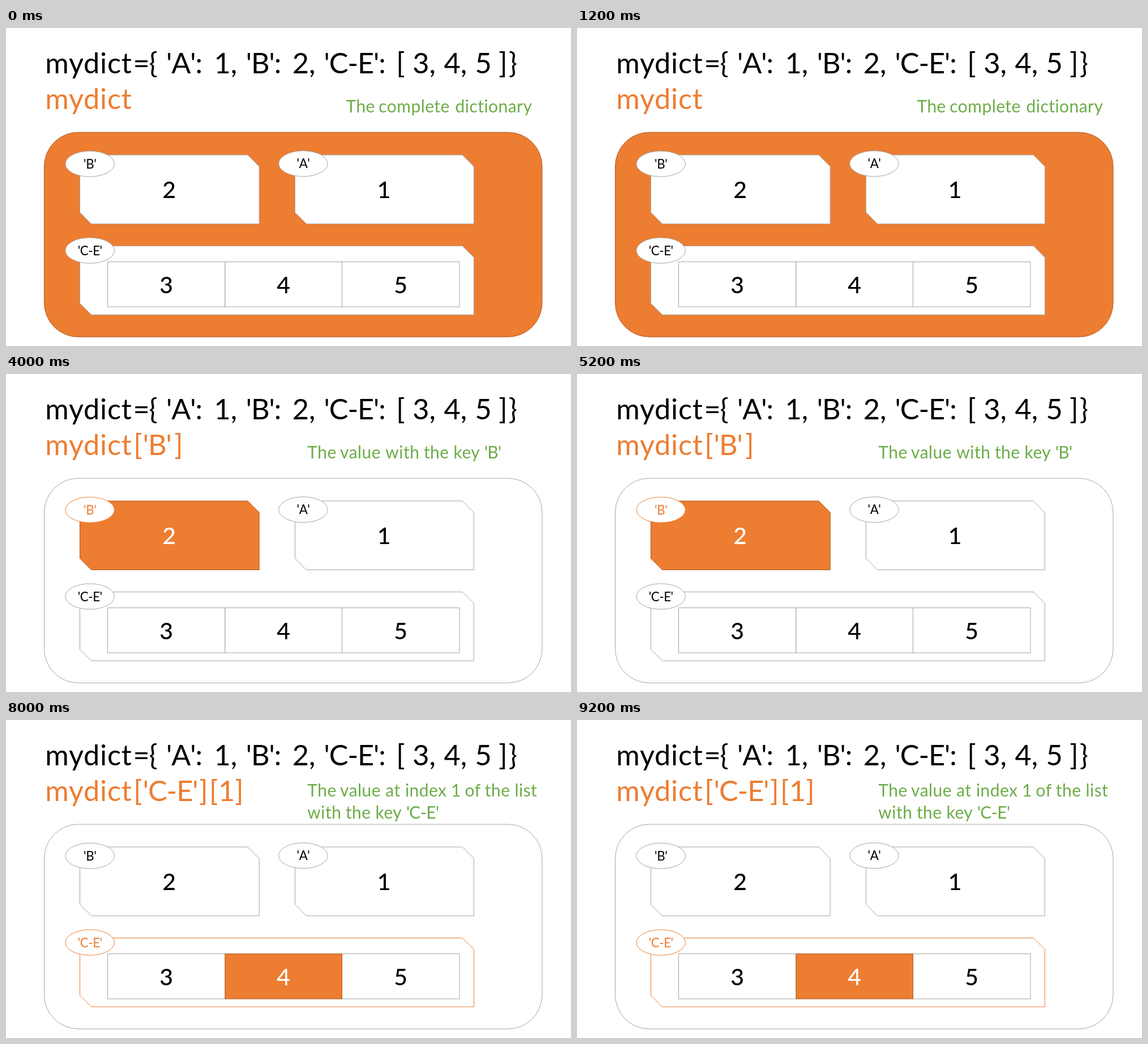
Recreate the animation shown at these times as an HTML page. Size 998x561 px, loop 10000 ms.

```html
<!DOCTYPE html>
<html lang="en">
<head>
<meta charset="utf-8">
<title>Dictionary lookup</title>
<style>
  html, body { margin: 0; width: 100%; height: 100%; overflow: hidden; background: #fff; }
  svg { display: block; width: 998px; height: 561px; font-family: Lato, Carlito, sans-serif; }
  .code { font-size: 50.5px; }
  .note { font-size: 30px; fill: #6bac46; }
  .value { font-size: 41px; font-weight: 500; text-anchor: middle; }
  .key { font-size: 22.4px; text-anchor: middle; letter-spacing: -.02em; font-kerning: none; }
  .word { letter-spacing: .015em; }
  .quoted { letter-spacing: -.022em; font-kerning: none; }
</style>
</head>
<body>
<svg id="stage" viewBox="0 0 998 561"></svg>
<script>
const STEP_MS = 2000;
const ORANGE = '#ed7d31', RUST = '#ae5a21', GREY = '#a5a5a5', BLACK = '#000', WHITE = '#fff';
const stage = document.getElementById('stage');

// A line is a list of [text, x] pairs, one per word or token.
const NAME = ['mydict', 69.3];
const TITLE = [
  NAME, ['=', 224.6], ['{', 252.6], ["'A':", 283], ['1,', 367.5],
  ["'B':", 423.8], ['2,', 505.8], ["'C-E':", 561.6], ['[', 689.3], ['3,', 718.2],
  ['4,', 773.4], ['5', 828.6], [']', 870.3], ['}', 887.8]
];
const THE_VALUE = [['The', 532.3], ['value', 590.1]];

const lookup = (key, close) => [NAME, ['[', 225.3], [key, 241.8], [']', close]];
const keyNote = key => [[149, [...THE_VALUE, ['with', 670.3], ['the', 737.9], ['key', 790.6], [key, 844.9]]]];

const SCENES = [
  { pick: 'all', code: [NAME],
    notes: [[149, [['The', 600.5], ['complete', 658.3], ['dictionary', 793.5]]]] },
  { pick: 'A', code: lookup("'A'", 299.1), notes: keyNote("'A'") },
  { pick: 'B', code: lookup("'B'", 297.2), notes: keyNote("'B'") },
  { pick: 'C-E', code: lookup("'C-E'", 341.2), notes: keyNote("'C-E'") },
  { pick: 'item', code: [...lookup("'C-E'", 341.2), ['[', 359.1], ['1', 374.9], [']', 404.2]],
    notes: [
      [134.5, [...THE_VALUE, ['at', 670.3], ['index', 704.9], ['1', 786.1], ['of', 810.5], ['the', 845.8], ['list', 898.5]]],
      [174, [['with', 532.3], ['the', 599.9], ['key', 652.6], ["'C-E'", 706.9]]]
    ] }
];

function line(cls, y, words, color) {
  const spans = words.map(([text, x]) => {
    const kind = text[0] === "'" ? 'quoted' : /[a-z]/.test(text) ? 'word' : '';
    return `<tspan class="${kind}" x="${x}">${text}</tspan>`;
  });
  return `<text class="${cls}" y="${y}"${color ? ` fill="${color}"` : ''}>${spans.join('')}</text>`;
}

const label = (cls, x, y, text, color) =>
  `<text class="${cls}" x="${x}" y="${y}" fill="${color}">${text}</text>`;

const paint = (fill, stroke) => `fill="${fill}" stroke="${stroke}"`;
const look = on => on ? paint(ORANGE, RUST) : paint(WHITE, GREY);

// Rectangle with its top right and bottom left corners cut off
function snipped(x1, y1, x2, y2, style) {
  const c = 20.2;
  return `<path d="M${x1} ${y1}H${x2 - c}L${x2} ${y1 + c}V${y2}H${x1 + c}L${x1} ${y2 - c}Z" ${style}/>`;
}

function keyTag(x, y, key, on) {
  return `<ellipse cx="${x}" cy="${y}" rx="43.3" ry="22.6" ${paint(WHITE, on ? ORANGE : GREY)}/>` +
    label('key', x, y + 8, `'${key}'`, on ? ORANGE : BLACK);
}

function entry(x1, x2, value, on) {
  return snipped(x1, 224, x2, 345.5, look(on)) +
    label('value', (x1 + x2) / 2 - 0.7, 300, value, on ? WHITE : BLACK);
}

function cells(pick) {
  const edges = [179.5, 387, 593.5, 801];
  const order = [0, 2, 1]; // the middle cell's border lies on top
  return order.map(i => {
    const x = edges[i], w = edges[i + 1] - x, on = pick === 'item' && i === 1;
    const style = pick === 'C-E' ? paint(WHITE, ORANGE) : look(on);
    return `<rect x="${x}" y="412.5" width="${w}" height="79.5" ${style}/>` +
      label('value', x + w / 2, 467.5, i + 3, on ? WHITE : BLACK);
  }).join('');
}

function draw({ pick, code, notes }) {
  const inList = pick === 'C-E' || pick === 'item';
  stage.innerHTML =
    line('code', 79.5, TITLE, BLACK) +
    line('code', 143, code, ORANGE) +
    notes.map(([y, words]) => line('note', y, words)).join('') +
    `<rect x="67.5" y="184" width="879.5" height="361" rx="60.2" ${look(pick === 'all')}/>` +
    entry(130.5, 447.2, 2, pick === 'B') +
    entry(510.5, 826.4, 1, pick === 'A') +
    snipped(130.5, 384.5, 826.4, 506, pick === 'item' ? paint(WHITE, ORANGE) : look(pick === 'C-E')) +
    cells(pick) +
    keyTag(148.2, 239.7, 'B', pick === 'B') +
    keyTag(525, 239.3, 'A', pick === 'A') +
    keyTag(148.2, 392.5, 'C-E', inList);
}

let shown = -1;
function tick() {
  const step = Math.floor(performance.now() / STEP_MS) % SCENES.length;
  if (step !== shown) draw(SCENES[shown = step]);
  requestAnimationFrame(tick);
}
tick();
</script>
</body>
</html>
```
